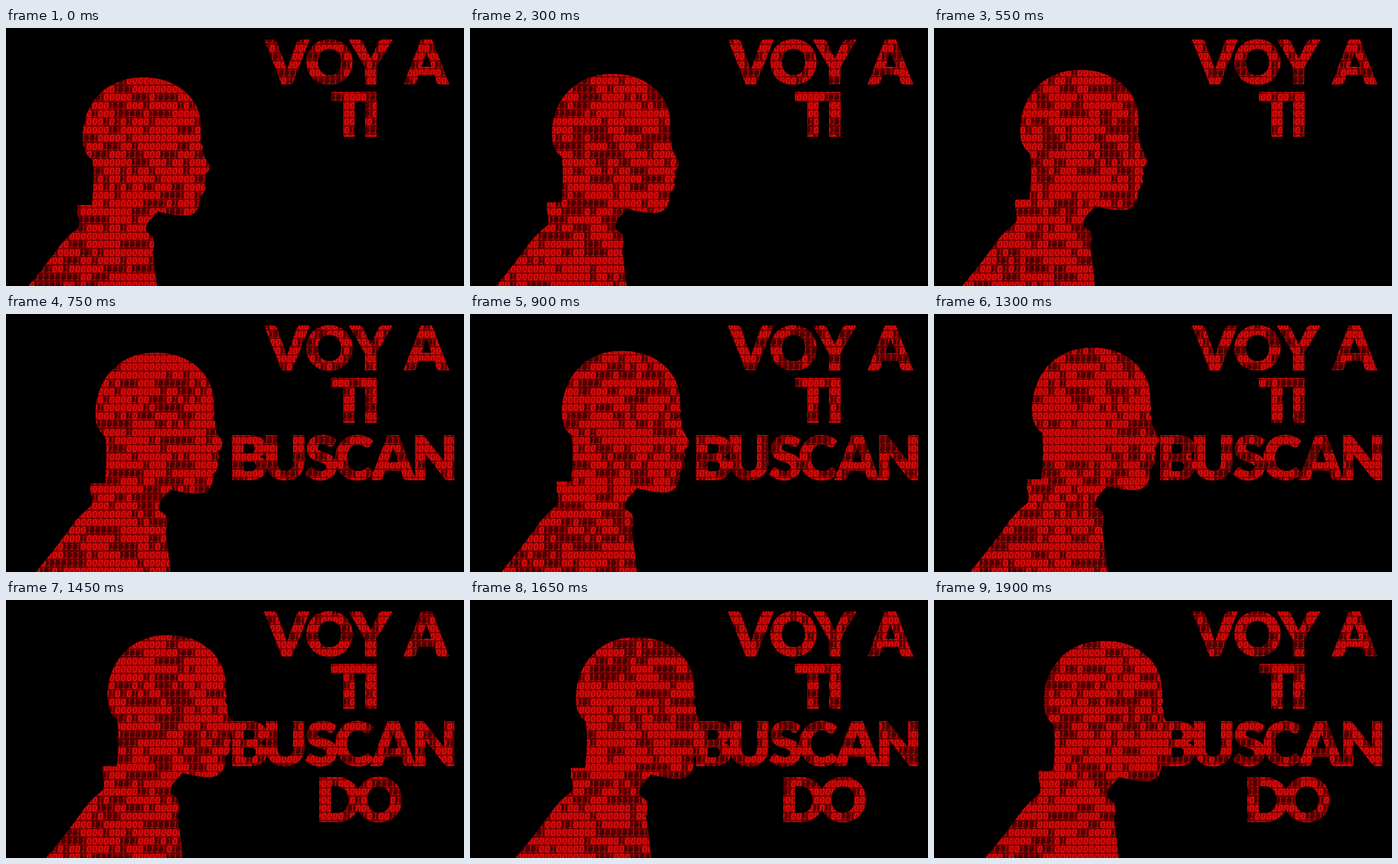
These frames come from a looping animation (640 px wide and 360 px high, 1.95 s). An HTML page with a canvas:

```html
<!DOCTYPE html>
<html lang="es">
<head>
<meta charset="utf-8">
<style>
html, body { margin: 0; width: 100%; height: 100%; overflow: hidden; background: #000; }
canvas { display: block; }
</style>
</head>
<body>
<canvas id="stage" width="640" height="360"></canvas>
<script>
const ctx = document.getElementById('stage').getContext('2d');
const LOOP = 1950, STEP = 50, CELL_W = 8, CELL_H = 11.4;

// Side view of the walker, facing right, at the start of the loop
const walker = new Path2D(`M-10 410 L31 360 L46 342 Q62 322 75 304 Q86 290 101 279
  Q104 270 100 260 L100 247 H120 Q124 215 121 184
  Q111 178 108 164 C105 146 109 124 119 107 C134 83 158 69 190 69
  C225 68 252 84 265 107 C272 121 273 134 272 147 L274 151 L271 158 L275 165
  Q273 172 277 178 L284 190 Q286 199 278 204 L280 212 L277 217 L279 223
  Q277 231 271 235 Q273 245 267 254 Q262 262 248 262 Q230 261 212 256
  L203 266 Q194 274 196 284 L205 291 Q209 301 205 313 L208 335 L211 360 L216 410 Z`);

// time, shift right, shift down
const path = [[0, 0, 0], [300, 7.5, -5], [750, 18, -15], [1050, 24.5, -20],
  [1300, 30, -22], [1650, 41, -17], [1950, 47.5, -11]];

// start time, letters, baseline, letter centres
const lines = [
  [0, 'VOYA', 78, [392.5, 452, 509.5, 587.5]],
  [0, 'TI', 151, [479, 510]],
  [650, 'BUSCAN', 231, [339, 390, 441, 486, 541, 599]],
  [1350, 'DO', 309, [464.5, 521]]
];

function rand(a, b, c) {
  const v = Math.sin(a * 127.1 + b * 311.7 + c * 74.7) * 43758.5453;
  return v - Math.floor(v);
}

function pose(t) {
  const i = path.findIndex(k => k[0] > t);
  const [a, b] = [path[i - 1], path[i]];
  const p = (t - a[0]) / (b[0] - a[0]);
  return [1, 2].map(j => a[j] + (b[j] - a[j]) * p);
}

function drawWalker(t) {
  const [dx, dy] = pose(t);
  // The shoulders rise less than the head
  ctx.setTransform(1, 0, 0, 1 - 0.00139 * dy, dx, 1.097 * dy);
  ctx.fill(walker);
  ctx.resetTransform();
}

function drawWords(t) {
  ctx.font = '900 83px Lato, sans-serif';
  ctx.lineWidth = 2;
  ctx.miterLimit = 3;
  for (const [start, word, y, centres] of lines) {
    if (t < start) continue;
    centres.forEach((x, i) => {
      ctx.fillText(word[i], x, y);
      ctx.strokeText(word[i], x, y);
    });
  }
}

function drawDigits(tick) {
  ctx.font = 'italic 12px "Liberation Sans", Arial, sans-serif';
  for (let r = 0; r * CELL_H < 360; r++) {
    for (let c = 0; c < 80; c++) {
      const run = Math.floor((c + r * 2) / 3);
      const age = Math.floor((tick + Math.floor(rand(run, r, 50) * 3)) / 3) % 13;
      const ones = rand(run, r, age) < 0.32;
      const one = ones !== (rand(c, r, age + 20) < 0.12);
      const x = c * CELL_W, y = r * CELL_H;
      ctx.fillStyle = one ? '#480000' : '#a80000';
      ctx.fillRect(x, y + 0.7, CELL_W - 0.5, CELL_H - 1.4);
      ctx.fillStyle = one ? '#d80606' : '#ff1414';
      ctx.fillText(one ? '1' : '0', x + CELL_W / 2, y + 10);
    }
  }
}

function draw(t) {
  ctx.clearRect(0, 0, 640, 360);
  ctx.textAlign = 'center';
  ctx.fillStyle = ctx.strokeStyle = '#700000';
  drawWalker(t);
  drawWords(t);
  ctx.globalCompositeOperation = 'source-atop';
  drawDigits(t / STEP);
  ctx.globalCompositeOperation = 'source-over';
}

let last = -1;
const begin = performance.now();
function loop() {
  const t = Math.floor((performance.now() - begin) % LOOP / STEP) * STEP;
  if (t !== last) draw(last = t);
  requestAnimationFrame(loop);
}
loop();
</script>
</body>
</html>
```
